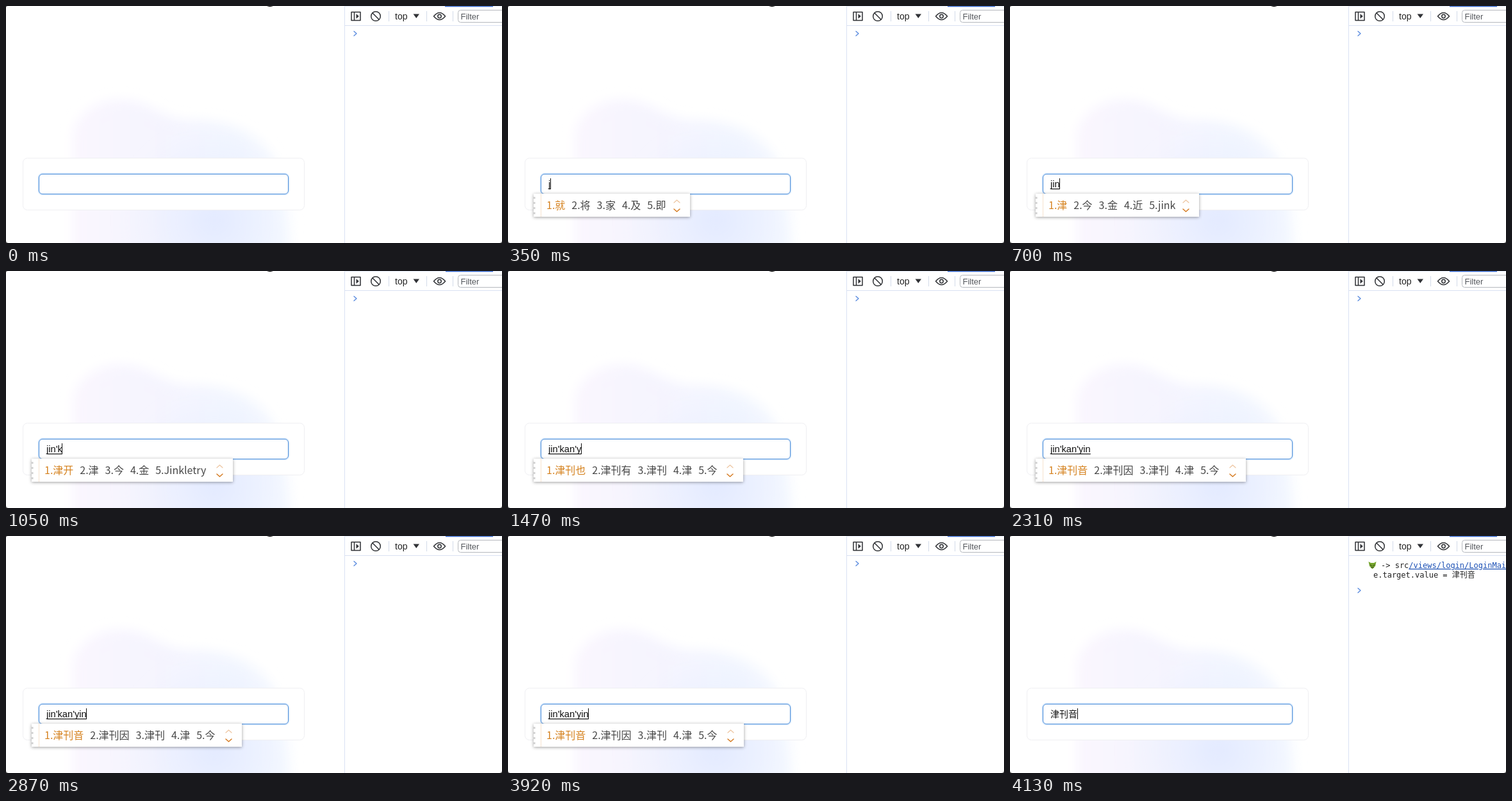
Animation, 774 px wide and 370 px high, one loop 4550 ms. Source, as an HTML page:

```html
<!DOCTYPE html>
<html lang="zh">
<head>
<meta charset="utf-8">
<style>
  html, body { margin: 0; width: 100%; height: 100%; overflow: hidden; background: #fff; }
  svg { display: block; }
  text { white-space: pre; }
  .ui { font-family: "Liberation Sans", "Noto Sans CJK SC", "Noto Sans CJK", sans-serif; }
  .cjk { font-family: "Noto Sans CJK SC", "Noto Sans CJK", sans-serif; font-size: 16px; }
  .mono { font: 12px "DejaVu Sans Mono", "Noto Sans CJK SC", "Noto Sans CJK", monospace; }
  .line { fill: none; stroke-linecap: round; stroke-linejoin: round; }
  #popup rect.panel { filter: drop-shadow(0 1px 2.5px rgba(0, 0, 0, .38)); }
</style>
</head>
<body>
<svg width="774" height="370" viewBox="0 0 774 370">
  <defs>
    <filter id="soft" x="-20%" y="-20%" width="140%" height="140%"><feGaussianBlur stdDeviation="9"/></filter>
    <linearGradient id="tint">
      <stop offset="0" stop-color="#faf6fe"/>
      <stop offset=".4" stop-color="#f5f4fe"/>
      <stop offset=".75" stop-color="#f2f6ff"/>
      <stop offset="1" stop-color="#f7faff"/>
    </linearGradient>
    <radialGradient id="core" gradientUnits="userSpaceOnUse" cx="325" cy="335" r="150">
      <stop offset="0" stop-color="#e3eaff"/>
      <stop offset="1" stop-color="#e9efff" stop-opacity="0"/>
    </radialGradient>
    <g id="cloud" class="line">
      <path d="M4 11a3.2 3.2 0 0 1 0-6a4.7 4.7 0 0 1 8.500 0a3.100 3.100 0 0 1 0 6z"/>
      <path d="M6 8a2.200 2.200 0 1 1 4 0"/>
    </g>
  </defs>

  <!-- page -->
  <path d="M104 400V205C106 165 150 142 190 147C225 151 245 176 285 179C325 176 370 188 398 212C430 242 448 300 445 400Z" fill="url(#tint)" filter="url(#soft)"/>
  <path d="M110 400V220C130 190 390 180 420 250L440 400Z" fill="url(#core)" filter="url(#soft)"/>
  <path class="line" d="M407 -1Q412 1.500 417 -1" stroke="#111" stroke-width="1.800"/>
  <rect x="26.500" y="237.500" width="439" height="81" rx="7" fill="#fff" stroke="#efeff2"/>
  <rect x="50.500" y="261.500" width="391" height="33" rx="7" fill="none" stroke="#d8eafd" stroke-width="2"/>
  <rect x="51.500" y="262.500" width="389" height="31" rx="5.500" fill="#fff" stroke="#4b8cd8"/>
  <text id="typed" class="ui" x="63" y="283" fill="#111"></text>
  <rect id="underline" x="64" y="285" height="1.200" fill="#111"/>
  <rect id="caret" y="269" width="1" height="17" fill="#111"/>

  <!-- candidate window -->
  <g id="popup">
    <rect class="panel" x="40" y="293" height="36" fill="#fff"/>
    <path d="M51.500 293V329" stroke="#f6e3cf"/>
    <path d="M41 298V328" stroke="#d2d2d2" stroke-width="3" stroke-dasharray="3 5"/>
    <g id="words" class="cjk"></g>
    <g id="arrows" class="line">
      <path d="M-25 307L-20.500 303L-16 307" stroke="#edc5a0" stroke-width="1.200"/>
      <path d="M-25 317L-20.500 321L-16 317" stroke="#d57a20" stroke-width="1.500"/>
    </g>
  </g>

  <!-- developer tools -->
  <rect x="528" width="246" height="370" fill="#fff"/>
  <path d="M528.500 0V370M528 30.500H774" stroke="#d9e1f3" fill="none"/>
  <path d="M528 .5H774" stroke="#e8edf8"/>
  <rect id="tab" y="0" height="1.300" fill="#3469d4"/>
  <path d="M597.500 8V24M656.500 8V24M697.500 8V24" stroke="#d3dbea"/>
  <g class="line" stroke="#303236" stroke-width="1.500">
    <path d="M539 9.500H553V22.500H539ZM543.500 9.500V22.500"/>
    <path d="M547 13L550.500 16L547 19Z" fill="#303236" stroke-width=".6"/>
    <circle cx="577" cy="16" r="7.300"/>
    <path d="M572 11L582 21"/>
    <path d="M667.500 16Q676.500 5 685.500 16Q676.500 27 667.500 16Z"/>
    <circle cx="676.500" cy="16" r="2.700"/>
  </g>
  <path d="M635.500 12.500H645L640.250 19Z" fill="#303236"/>
  <rect x="705.500" y="6.500" width="80" height="19" rx="4" fill="#fff" stroke="#b5b8be"/>
  <g class="ui">
    <text x="607" y="20.500" font-size="14" fill="#222">top</text>
    <text x="709.500" y="21" font-size="13" fill="#55585d">Filter</text>
  </g>
  <path id="prompt" class="line" d="M543 39.500L547 43L543 46.500" stroke="#5688de" stroke-width="1.300"/>
  <g id="log" class="mono" fill="#222">
    <path d="M559.500 40L563 42H568L571.500 40L570 47L565.500 51.500L561 47Z" fill="#75a52c"/>
    <path d="M562 45L564.500 46.500M569 45L566.500 46.500M563.500 49H567.500" stroke="#34451c" class="line"/>
    <text x="579" y="50">-&gt; src<tspan fill="#1a4fb4" text-decoration="underline">/views/login/LoginMain.vue</tspan></text>
    <text x="567" y="64.500">e.target.value = 津刊音</text>
  </g>

  <!-- rounded window corners -->
  <path d="M0 0H3Q0 0 0 3ZM0 370V366Q0 370 4 370ZM774 370V366Q774 370 770 370Z" fill="#555"/>
</svg>
<script>
const LOOP = 4550, COMMIT = 4130, NAME = "津刊音";
const $ = id => document.getElementById(id);

// start time, typed letters, right edge of the candidate window, candidates (* is the cloud)
const steps = [
  [0, "", 0, ""],
  [280, "j", 0, ""],
  [350, "j", 284, "就 将 家 及 即"],
  [490, "ji", 287, "及 几 级 即 既"],
  [700, "jin", 295, "津 今 金 近 jink"],
  [910, "jin'k", 373, "津开 * 津 今 Jinkletry"],
  [1050, "jin'k", 354, "津开 津 今 金 Jinkletry"],
  [1120, "jin'ka", 335, "津卡 津咖 津喀 津 今"],
  [1260, "jin'kan", 335, "津刊 津咖 津喀 津 今"],
  [1470, "jin'kan'y", 367, "津刊也 津刊有 津刊 津 今"],
  [1680, "jin'kan'yi", 381, "津刊衣 * 津刊仪 津刊 津"],
  [1750, "jin'kan'yi", 368, "津刊衣 津刊仪 津刊 津 今"],
  [1820, "jin'kan'yin", 348, "津刊音 * 津刊 津 今"],
  [1890, "jin'kan'yin", 368, "津刊音 津刊因 津刊 津 今"],
  [COMMIT, NAME, 0, ""]
];
const caretOff = [[0, 280], [2310, 2800], [3430, 3920]];

function candidates(list) {
  let x = 60;
  return list.split(" ").map((word, i) => {
    const cloud = word === "*", fill = i ? "#474747" : "#d5821f";
    let out = `<text x="${x}" y="317" fill="${fill}">${i + 1}.${cloud ? "" : word}</text>`;
    if (cloud) out += `<use href="#cloud" x="${x + 14.5}" y="304.5" stroke="#555"/>
      <g transform="translate(${x + 29} 306) scale(.8)"><use href="#cloud" stroke="#ccc"/></g>`;
    x += 23.3 + (cloud ? 29.5 : 16 * word.length);
    return out;
  }).join("");
}

function show([start, letters, right, list]) {
  const done = start === COMMIT;
  $("typed").textContent = letters;
  $("typed").setAttribute("font-size", done ? 14 : 14.7);
  const width = letters ? $("typed").getComputedTextLength() : 0;
  $("underline").setAttribute("width", done ? 0 : Math.max(0, width - 1));
  $("caret").setAttribute("x", Math.round(63 + width - .5));
  $("popup").style.display = right ? "" : "none";
  if (right) {
    document.querySelector(".panel").setAttribute("width", right - 40);
    $("words").innerHTML = candidates(list);
    $("arrows").setAttribute("transform", `translate(${right} 0)`);
  }
  $("log").style.display = done ? "" : "none";
  $("prompt").setAttribute("transform", `translate(0 ${done ? 42 : 0})`);
}

let current;
function draw() {
  const t = performance.now() % LOOP;
  const step = steps.findLast(s => s[0] <= t);
  if (step !== current) show(current = step);
  const hidden = caretOff.some(([from, to]) => t >= from && t < to);
  $("caret").style.display = hidden ? "none" : "";
  const left = t < 70 ? 685 : 686;
  $("tab").setAttribute("x", left);
  $("tab").setAttribute("width", 760 - left);
  requestAnimationFrame(draw);
}
draw();
</script>
</body>
</html>
```
